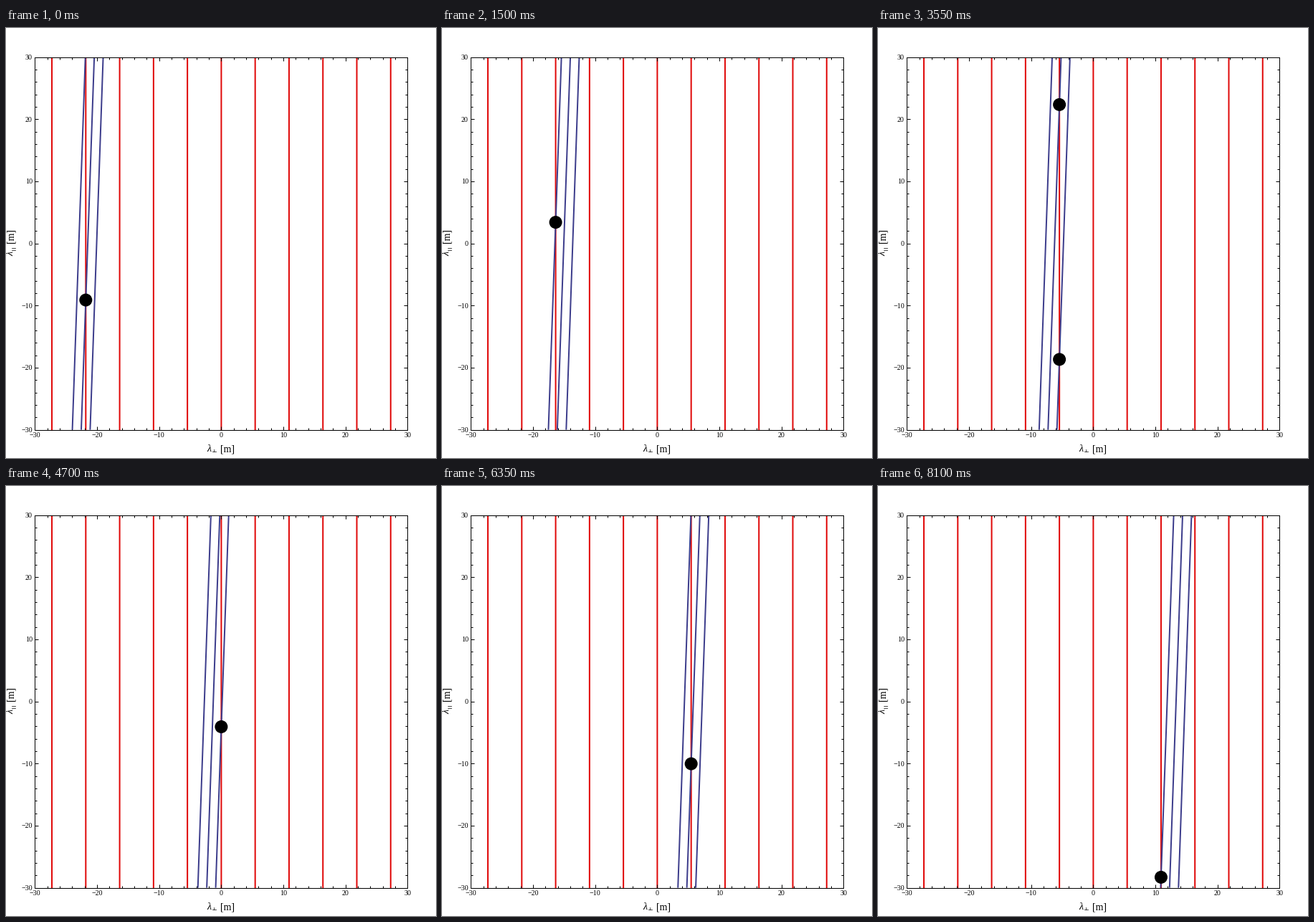
A matplotlib script for the animation above (8150 ms loop, 600 by 600 pixels).

```python
import numpy as np
import matplotlib.pyplot as plt
from matplotlib.animation import FuncAnimation
from matplotlib.lines import Line2D
from matplotlib.patches import Circle
from matplotlib.ticker import MultipleLocator

SIZE, DPI = 600, 100
FRAMES, INTERVAL = 163, 50
LIM = 30
RED, BLUE = "#e00808", "#3d3d8c"
STEP = 60 / 11                     # spacing of the fixed lines
START, SPEED = -21.5, 0.215        # centre of the moving triple
GAP = 1.4325                       # spacing inside the triple
SLOPE = np.tan(np.radians(2))
PT = 72 / DPI                      # points per pixel
SIDE = 520                         # plot side in pixels

plt.rcParams["font.family"] = "Liberation Serif"

fig = plt.figure(figsize=(SIZE / DPI, SIZE / DPI), dpi=DPI, facecolor="white")
ax = fig.add_axes([40.4 / SIZE, 39.4 / SIZE, SIDE / SIZE, SIDE / SIZE])
ax.set(xlim=(-LIM, LIM), ylim=(-LIM, LIM))

for axis in (ax.xaxis, ax.yaxis):
    axis.set_major_locator(MultipleLocator(10))
    axis.set_minor_locator(MultipleLocator(2))
ax.tick_params(which="both", direction="in", top=True, right=True, width=PT)
ax.tick_params(which="major", length=5 * PT, labelsize=10 * PT, pad=3.5 * PT)
ax.tick_params(which="minor", length=3 * PT)
for spine in ax.spines.values():
    spine.set_linewidth(PT)


def label(x, y, text, **kw):
    fig.text(x / SIZE, 1 - y / SIZE, text, fontsize=14 * PT,
             va="baseline", rotation_mode="anchor", **kw)


def stroke(x0, y0, x1, y1):
    fig.add_artist(Line2D([x0 / SIZE, x1 / SIZE], [1 - y0 / SIZE, 1 - y1 / SIZE],
                          color="black", lw=0.7 * PT))


# Axis titles, with the perpendicular and parallel subscripts as strokes
label(280, 591, "λ", style="italic")
label(298.5, 591, "[m]")
stroke(287.5, 591.4, 292.5, 591.4)
stroke(290.4, 588, 290.4, 591.4)

label(10, 318.5, "λ", style="italic", rotation=90)
label(10, 300, "[m]", rotation=90)
stroke(7.5, 310.4, 13, 310.4)
stroke(7.5, 307.4, 13, 307.4)

for k in range(-5, 6):
    ax.axvline(k * STEP, color=RED, lw=2 * PT, zorder=1, snap=False)
rays = [ax.plot([], [], color=BLUE, lw=2 * PT, solid_capstyle="butt", zorder=2)[0]
        for _ in range(3)]
dots = [ax.add_patch(Circle((0, 0), 9 * 2 * LIM / SIDE, fc="black", lw=0, zorder=2.4))
        for _ in range(3)]


def draw(i):
    centers = START + SPEED * i + GAP * np.array([-1, 0, 1])
    for c, ray, dot in zip(centers, rays, dots):
        ray.set_data([c - LIM * SLOPE, c + LIM * SLOPE], [-LIM, LIM])
        x = STEP * round(c / STEP)      # nearest fixed line
        dot.center = x, (x - c) / SLOPE
    return rays + dots


anim = FuncAnimation(fig, draw, frames=FRAMES, interval=INTERVAL,
                     repeat=True, repeat_delay=0, blit=False)
plt.show()
```
